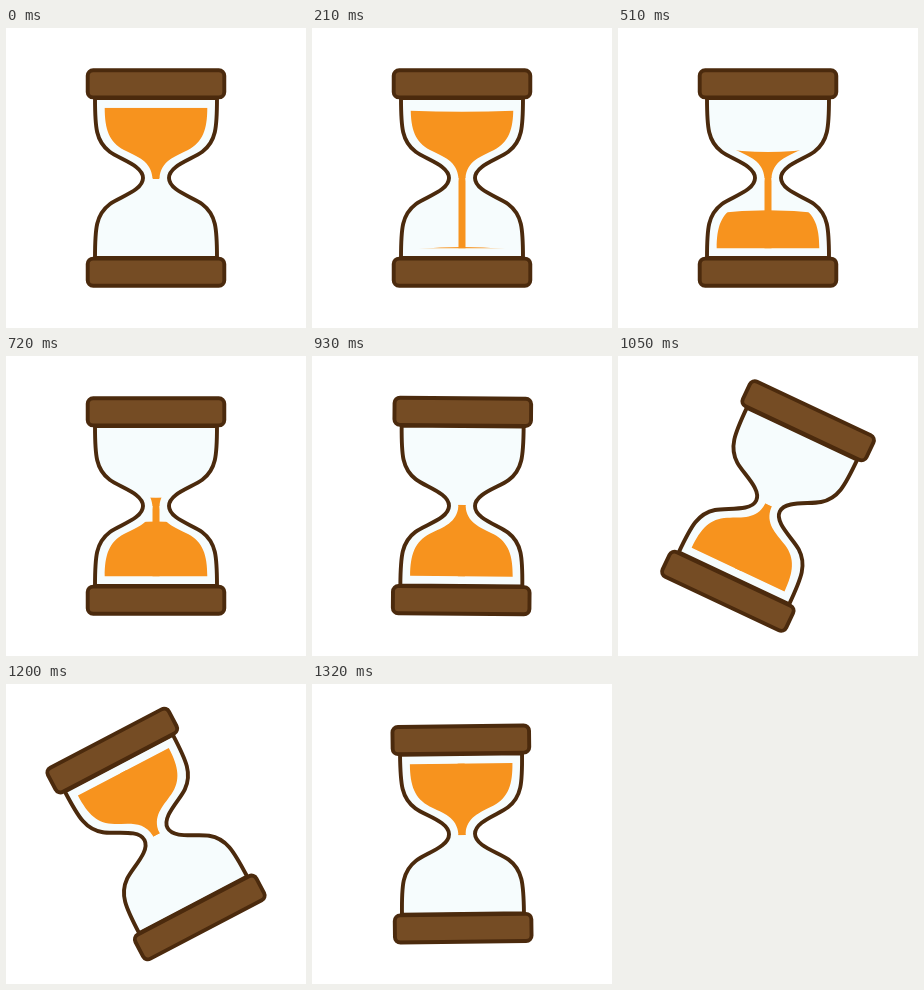
Animation of 300x300 px, one loop 1.35 s. Source, as an HTML page with a canvas:

```html
<!DOCTYPE html>
<html lang="en">
<head>
<meta charset="utf-8">
<title>Hourglass</title>
<style>
  html, body { margin: 0; width: 100%; height: 100%; overflow: hidden; background: #fff; }
  canvas { display: block; width: 100vw; height: 100vh; }
</style>
</head>
<body>
<canvas id="stage" width="300" height="300"></canvas>
<script>
const ctx = document.getElementById('stage').getContext('2d');

const LOOP = 1350, STEP = 30, POUR_END = 900, TURN_START = 905;
const WOOD = '#754c24', OUTLINE = '#4b2a0d', GLASS = '#f6fcfd', SAND = '#f7931e';

const clamp01 = v => Math.min(1, Math.max(0, v));

// Cubic-bezier(.65, 0, .35, 1), solved by bisection.
function ease(x) {
  x = clamp01(x);
  let lo = 0, hi = 1;
  for (let i = 0; i < 24; i++) {
    const s = (lo + hi) / 2, r = 1 - s;
    if (1.95 * s * r * r + 1.05 * s * s * r + s * s * s < x) lo = s; else hi = s;
  }
  return lo * lo * (3 - 2 * lo);
}

// Upper-left wall from rim to neck: start point, then two curves.
const GLASS_WALL = [-61, -80, -61, -50, -60, -36.5, -46.3, -26.2, -36.3, -18.7, -13, -12.5, -13, 0];
const SAND_WALL = [-51.3, -70.3, -51.3, -49, -47, -36, -32, -28, -18, -21, -5, -17, -3.5, 0];

// Mirrors one wall into a closed hourglass outline.
function hourglass(wall) {
  const points = [];
  for (let i = 0; i < wall.length; i += 2) points.push([wall[i], wall[i + 1]]);
  const back = points.slice().reverse();
  const path = new Path2D();
  const trace = list => {
    for (let i = 1; i < list.length; i += 3) {
      path.bezierCurveTo(...list[i], ...list[i + 1], ...list[i + 2]);
    }
  };
  path.moveTo(...points[0]);
  trace(points);
  trace(back.map(([x, y]) => [x, -y]));
  path.lineTo(-points[0][0], -points[0][1]);
  trace(points.map(([x, y]) => [-x, -y]));
  trace(back.map(([x, y]) => [-x, y]));
  path.closePath();
  return path;
}

const glass = hourglass(GLASS_WALL);
const sandRoom = hourglass(SAND_WALL);

// Fills from a curved surface down to a flat floor.
function fillBelow(edge, control, floor) {
  ctx.beginPath();
  ctx.moveTo(-52, edge);
  ctx.quadraticCurveTo(0, control, 52, edge);
  ctx.lineTo(52, floor);
  ctx.lineTo(-52, floor);
  ctx.fill();
}

function drawSand(t) {
  const p = ease(t / POUR_END);
  const late = clamp01((t - 720) / (POUR_END - 720));
  const sag = clamp01(p * 4);
  const top = -70.3 + 63.3 * p + 4.5 * late;
  const pile = 73.5 - 59.5 * p - 14 * late;
  const tip = Math.min(71, 1 + 70 * (t / 200) ** 2);

  ctx.save();
  ctx.clip(sandRoom);
  ctx.fillStyle = SAND;
  fillBelow(top - 3 * sag, top + 6 * sag, 0);
  ctx.fillRect(-3.5, -0.5, 7, tip + 0.5);
  if (pile < 71) fillBelow(pile + 2, pile - 4, 71);
  ctx.restore();
}

function drawCap(y) {
  ctx.beginPath();
  ctx.roundRect(-68.3, y, 136.6, 27.2, 5.5);
  ctx.fillStyle = WOOD;
  ctx.fill();
  ctx.stroke();
}

function draw(t) {
  ctx.setTransform(1, 0, 0, 1, 0, 0);
  ctx.fillStyle = '#fff';
  ctx.fillRect(0, 0, 300, 300);
  ctx.translate(150, 150);
  ctx.rotate(Math.PI * ease((t - TURN_START) / (LOOP - TURN_START)));

  ctx.strokeStyle = OUTLINE;
  ctx.lineWidth = 3.9;
  ctx.fillStyle = GLASS;
  ctx.fill(glass);
  ctx.stroke(glass);
  drawSand(Math.min(t, POUR_END));
  drawCap(-107.8);
  drawCap(80.6);
}

const start = performance.now();
function tick() {
  const t = (performance.now() - start) % LOOP;
  draw(Math.floor(t / STEP) * STEP);
  requestAnimationFrame(tick);
}
tick();
</script>
</body>
</html>
```
